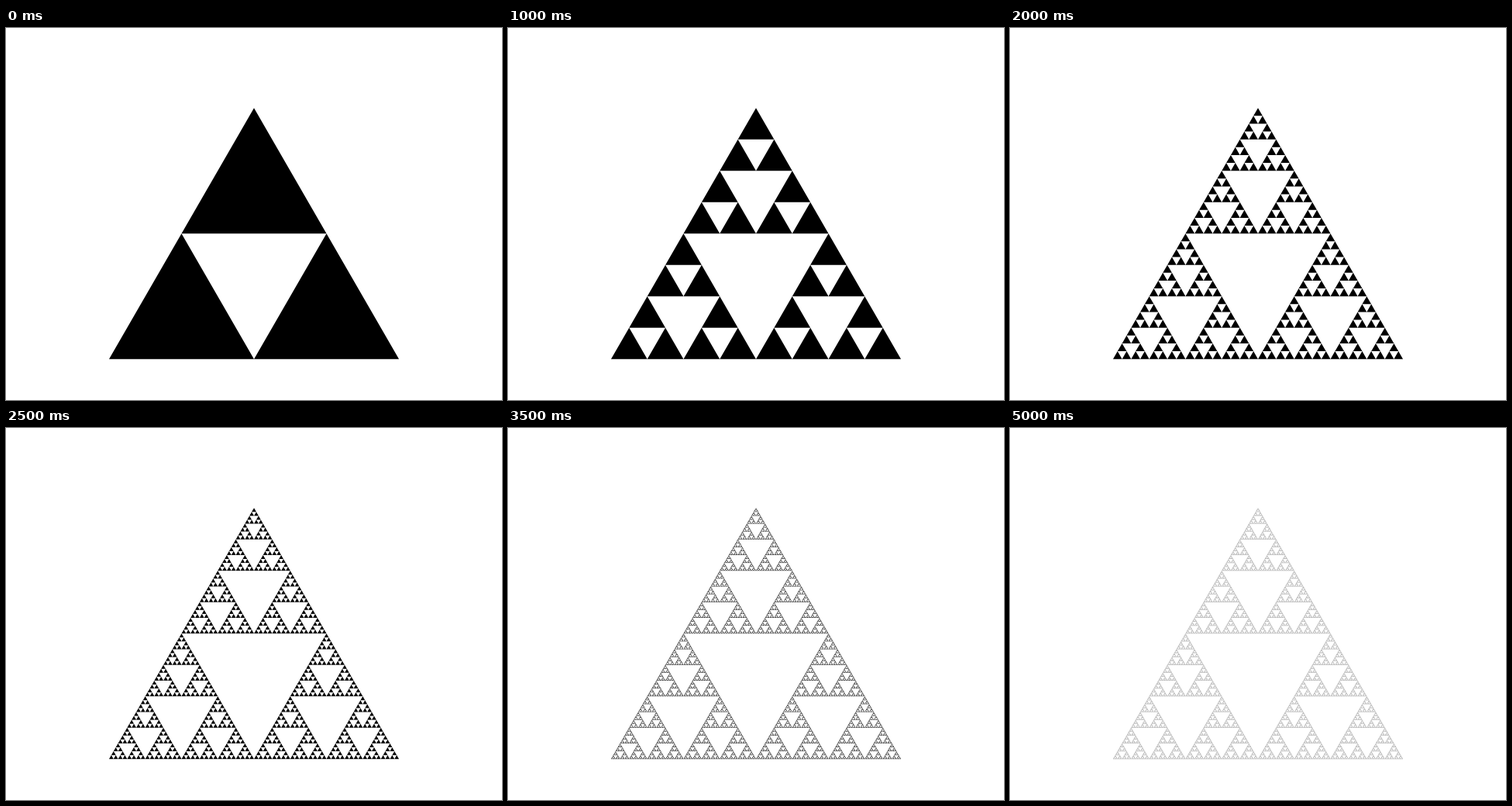
Recreate the animation shown at these times as an HTML page with a canvas. Size 640 px wide and 480 px high, loop 5.5 s.

```html
<!DOCTYPE html>
<html lang="en">
<head>
<meta charset="utf-8">
<title>Sierpinski triangle</title>
<style>
  html, body { margin: 0; width: 100%; height: 100%; overflow: hidden; background: #fff; }
  canvas { display: block; }
</style>
</head>
<body>
<canvas id="stage" width="640" height="480"></canvas>
<script>
const W = 640, H = 480;
const STEP = 500, STEPS = 11;
const APEX_X = 320, APEX_Y = 103.2, HEIGHT = 324;
const SIDE = HEIGHT * 2 / Math.sqrt(3);
const ctx = document.getElementById('stage').getContext('2d');

// Calls visit(x, y, h) with the apex and height of every solid triangle.
function sierpinski(x, y, h, depth, visit) {
  if (depth === 0) return visit(x, y, h);
  const half = h / 2, dx = half * SIDE / HEIGHT / 2;
  sierpinski(x, y, half, depth - 1, visit);
  sierpinski(x - dx, y + half, half, depth - 1, visit);
  sierpinski(x + dx, y + half, half, depth - 1, visit);
}

function newLayer() {
  const layer = document.createElement('canvas');
  layer.width = W;
  layer.height = H;
  return layer;
}

function drawLarge(depth) {
  const layer = newLayer(), g = layer.getContext('2d');
  g.beginPath();
  sierpinski(APEX_X, APEX_Y, HEIGHT, depth, (x, y, h) => {
    const dx = h * SIDE / HEIGHT / 2;
    g.moveTo(x, y);
    g.lineTo(x + dx, y + h);
    g.lineTo(x - dx, y + h);
    g.closePath();
  });
  g.fill();
  return layer;
}

// Tiny triangles: sum the exact area that falls on each pixel.
function drawFine(depth) {
  const layer = newLayer(), g = layer.getContext('2d');
  const cover = new Float32Array(W * H);
  const split = 2 ** Math.max(0, STEPS - depth);
  sierpinski(APEX_X, APEX_Y, HEIGHT, depth, (x, y, h) => {
    const s = h / split, w = s * SIDE / HEIGHT, area = s * w / 2;
    for (let row = 0; row < split; row++) {
      for (let i = 0; i <= 2 * row; i++) {
        const up = i % 2 === 0;
        const px = Math.floor(x + (i - row) * w / 2);
        const py = Math.floor(y + (row + (up ? 2 / 3 : 1 / 3)) * s);
        cover[py * W + px] += area;
      }
    }
  });
  const image = g.createImageData(W, H);
  cover.forEach((c, i) => { image.data[i * 4 + 3] = Math.min(255, Math.round(c * 255)); });
  g.putImageData(image, 0, 0);
  return layer;
}

const layers = [];
for (let depth = 1; depth <= STEPS; depth++) {
  layers.push(depth < 6 ? drawLarge(depth) : drawFine(depth));
}

const start = performance.now();
function frame(now) {
  const t = Math.max(0, now - start) % (STEP * STEPS);
  ctx.fillStyle = '#fff';
  ctx.fillRect(0, 0, W, H);
  ctx.drawImage(layers[Math.floor(t / STEP)], 0, 0);
  requestAnimationFrame(frame);
}
frame(start);
</script>
</body>
</html>
```
